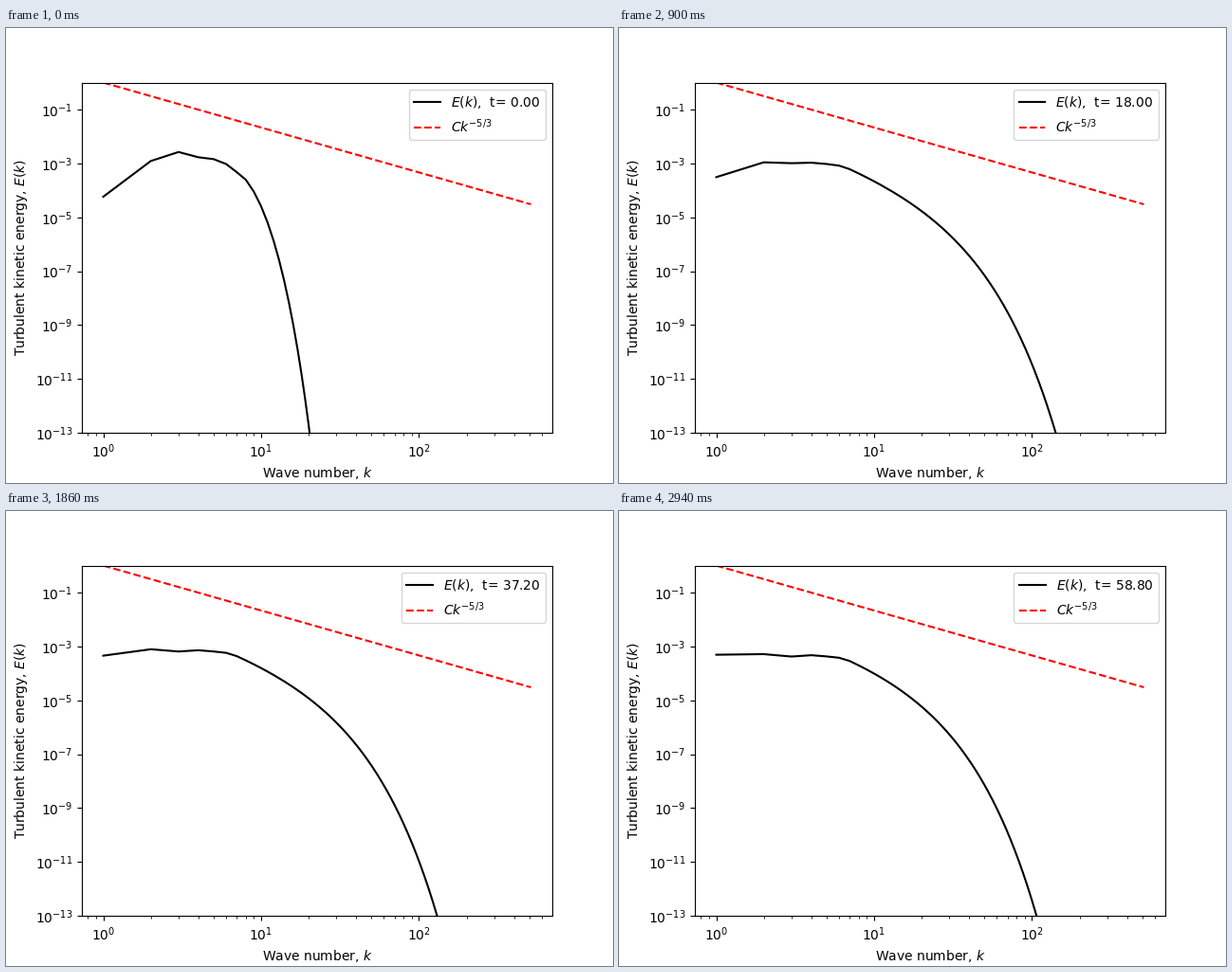
Animation of 640 by 480 pixels, one loop 3 s. Source, as a matplotlib script:

```python
import numpy as np
import matplotlib.pyplot as plt
from matplotlib.animation import FuncAnimation

FRAMES, INTERVAL, DT = 50, 60, 1.2
FLOOR = -13          # log10 of the lower axis limit
K0 = 7               # last large-scale mode, the tail starts here

k = np.arange(1, 513)
modes, tail_k = k[:K0], k[K0:]

# log10 E of the large scales: initial field and developed turbulence
initial = np.array([-4.235, -2.91, -2.575, -2.77, -2.84, -3.02, -3.32])
developed = np.array([-3.3, -2.785, -2.875, -2.825, -2.87, -2.92, -3.04])


def large_scales(t):
    """Relax towards the developed state while all but k = 1 lose energy."""
    rest = np.exp(-t * modes ** 0.3 / 12)
    return developed + (initial - developed) * rest - 0.0085 * t * (modes > 1)


def cutoff(t):
    """Wave number where the spectrum meets the axis floor."""
    return 146 - 0.0113 * t ** 2 - 125.7 * np.exp(-(t / 5.23) ** 1.3)


def small_scales(t, top):
    """Drop from a steep initial fall to a power law with viscous decay."""
    kc = cutoff(t)
    depth = top - FLOOR
    steep = depth * ((tail_k - K0) / (kc - K0)) ** 1.364
    p = 2 - 0.008 * t
    b = (depth - p * np.log10(kc / K0)) / (kc - K0)
    viscous = p * np.log10(tail_k / K0) + b * (tail_k - K0)
    w = np.exp(-t / 2.5)
    return top - w * steep - (1 - w) * viscous


def spectrum(t):
    head = large_scales(t)
    return 10 ** np.concatenate([head, small_scales(t, head[-1])]).clip(-60)


def label(t):
    return f"$E(k)$,  t= {t:.2f}"


fig, ax = plt.subplots(figsize=(6.4, 4.8), dpi=100)
line, = ax.loglog(k, spectrum(0), "k-", label=label(0))
ax.loglog(k, k ** (-5 / 3), "r--", label="$Ck^{-5/3}$")
ax.set_ylim(10.0 ** FLOOR, 1)
ax.set_xlabel("Wave number, $k$")
ax.set_ylabel("Turbulent kinetic energy, $E(k)$")
legend = ax.legend(loc="upper right")


def update(i):
    t = i * DT
    line.set_ydata(spectrum(t))
    legend.get_texts()[0].set_text(label(t))
    return line, legend


anim = FuncAnimation(fig, update, frames=FRAMES, interval=INTERVAL,
                     repeat=True, repeat_delay=0, blit=False)
plt.show()
```
